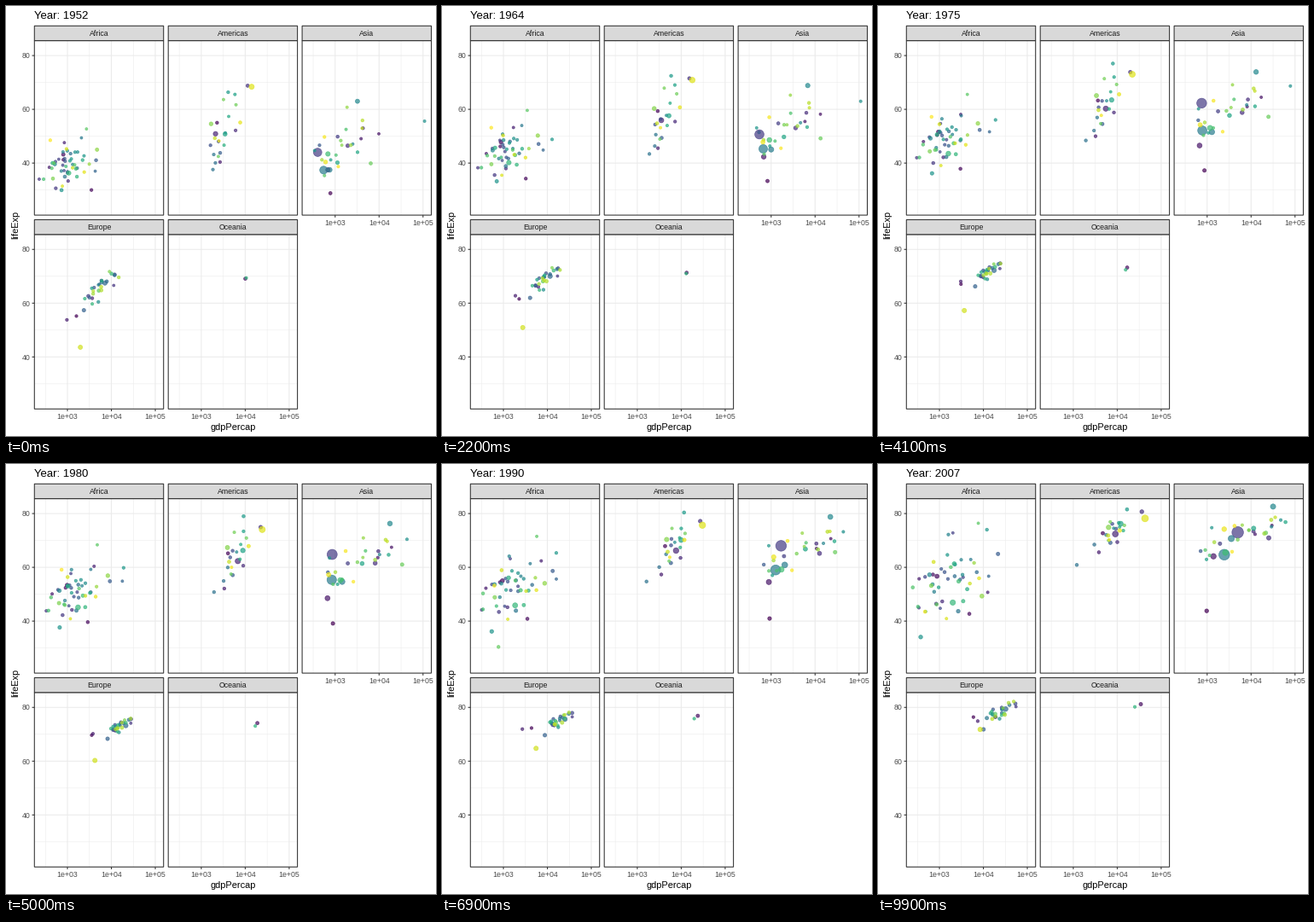
A matplotlib script that plays this animation: 504 px wide and 504 px high, repeating every 10000 ms.

```python
import numpy as np
import matplotlib.pyplot as plt
from matplotlib.animation import FuncAnimation
from matplotlib.patches import Rectangle

plt.rcParams.update({"font.family": "Liberation Sans", "path.snap": False})

SIDE, FRAMES, TOTAL = 504, 100, 142
LEFT, GAP, PW, PH, STRIP = 33.3, 5.5, 151.4, 204.5, 17.3
TOPS = (40.6, 267.8)
XLIM, YLIM = (2.2487, 5.1887), (20.65, 85.55)
STOPS = (52, 80, 107)            # years since 1900
YEARS = np.linspace(STOPS[0], STOPS[-1], FRAMES)
U = np.linspace(0, 1, FRAMES)

# Leading dots: colour rank, millions at the end, then income and life per stop
AFRICA = [
    (107, 9, 493, 40, 880, 46, 863, 46.2),
    (75, 6, 2388, 42.7, 19000, 60, 12057, 74),
    (45, 1, 4293, 37, 18000, 55, 13206, 56.7),
    (3, 12, 3521, 30, 2900, 39.7, 4797, 42.7),
    (105, 1, 2719, 52.7, 4800, 68.5, 7670, 76.4),
    (13, 2, 851, 47.6, 4100, 60.5, 12570, 50.7),
    (94, 135, 1077, 36.3, 1750, 45.2, 2014, 46.9),
    (117, 44, 4725, 45, 8350, 57, 9270, 49.3),
    (141, 12, 407, 48.5, 740, 59.2, 470, 43.5)]
AMERICAS = [
    (134, 301, 13990, 68.4, 24500, 74.1, 42952, 78.2),
    (20, 33, 11367, 68.8, 22600, 75, 36319, 80.7),
    (14, 190, 2109, 50.9, 6850, 62.4, 9066, 72.4),
    (82, 109, 3478, 50.8, 8900, 66.4, 11978, 76.2),
    (53, 9, 1840, 37.6, 1950, 50.9, 1202, 60.9),
    (11, 9, 2677, 40.4, 3350, 52.2, 3822, 65.6),
    (136, 26, 7690, 55.1, 12000, 68, 11416, 73.7)]
ASIA = [
    (24, 1319, 400, 44, 860, 64.9, 4959, 73),
    (58, 1110, 547, 37.4, 840, 55.5, 2452, 64.7),
    (59, 224, 750, 37.5, 1450, 54.8, 3541, 70.7),
    (66, 127, 3217, 63, 17900, 76.4, 31656, 82.6),
    (71, 3, 108382, 55.6, 42000, 70.5, 47307, 77.6),
    (0, 32, 779, 28.8, 890, 39.2, 975, 43.8),
    (8, 150, 684, 37.5, 670, 48.6, 1391, 64.1),
    (97, 169, 685, 43.4, 1320, 55.3, 2606, 65.5),
    (109, 28, 6460, 39.9, 33900, 61.2, 21655, 72.8),
    (7, 1, 9867, 50.9, 19300, 67.6, 29796, 75.6),
    (137, 85, 605, 40.4, 715, 57.4, 2442, 74.2)]
EUROPE = [
    (131, 71, 1969, 43.6, 4250, 60.4, 8458, 71.8),
    (12, 5, 974, 53.8, 3850, 70.3, 7446, 74.9),
    (1, 4, 1601, 55.2, 3600, 69.8, 5937, 76.4),
    (123, 8, 14734, 69.6, 27600, 75.9, 37506, 81.7),
    (47, 82, 7144, 67.5, 21500, 73.3, 32170, 79.4)]
OCEANIA = [
    (5, 20, 10040, 69.1, 19000, 74.2, 34435, 81.2),
    (91, 4, 10557, 69.4, 17000, 73.1, 25185, 80.2)]

# Extra stops for dots that turn sharply: year, income, life
TURNS = {24: [(62, 488, 44.5), (67, 613, 58.4)],
         71: [(72, 109348, 67.7)],
         75: [(67, 18773, 50.2)],
         13: [(92, 7954, 62.7), (102, 11004, 46.6)],
         107: [(87, 848, 44), (92, 737, 23.6), (97, 590, 36.1)],
         12: [(67, 2172, 64.8), (92, 2547, 72.2)]}

# name: leaders, column, row, crowd count, income-life correlation, growth
PANELS = {"Africa": (AFRICA, 0, 0, 43, 0.45, 0.4),
          "Americas": (AMERICAS, 1, 0, 18, 0.55, 0.4),
          "Asia": (ASIA, 2, 0, 22, 0.7, 0.42),
          "Europe": (EUROPE, 0, 1, 25, 0.85, 0.8),
          "Oceania": (OCEANIA, 1, 1, 0, 0, 0.5)}

# Crowd per stop: mean and spread of log income, mean and spread of life
CROWDS = {
    "Africa": [(2.98, .26, 39, 4.3), (3.13, .28, 50.3, 5), (3.18, .38, 55, 8)],
    "Americas": [(3.47, .18, 52, 7.5), (3.76, .17, 65, 5.5), (3.9, .22, 73.5, 2.8)],
    "Asia": [(3.15, .33, 47, 7.5), (3.56, .4, 62.5, 6), (3.78, .5, 71.8, 4.6)],
    "Europe": [(3.72, .2, 65.5, 3.8), (4.18, .15, 73, 1.9), (4.36, .23, 78, 2.6)]}

rng = np.random.default_rng(7)


def px(left, lg):
    return left + (lg - XLIM[0]) / (XLIM[1] - XLIM[0]) * PW


def py(top, life):
    return top + (YLIM[1] - life) / (YLIM[1] - YLIM[0]) * PH


def corner(col, row):
    return LEFT + col * (PW + GAP), TOPS[row]


def leader_track(rank, values):
    stops = list(zip(STOPS, values[::2], values[1::2])) + TURNS.get(rank, [])
    t, income, life = np.transpose(sorted(stops))
    return np.interp(YEARS, t, np.log10(income)), np.interp(YEARS, t, life)


def spread(n):
    """Normal scores with mean 0 and deviation 1, without far tails."""
    z = np.clip(rng.normal(size=n), -2, 2)
    return (z - z.mean()) / z.std()


def crowd_tracks(params, n, rho):
    """A cloud whose centre and width follow the stops while dots drift in it."""
    mg, sg, ml, sl = (np.interp(YEARS, STOPS, p)[:, None]
                      for p in np.transpose(params))
    turn = 0.7 * U[:, None]
    za, zb = (np.cos(turn) * spread(n) + np.sin(turn) * spread(n)
              for _ in range(2))
    life = ml + sl * (rho * za + np.sqrt(1 - rho ** 2) * zb)
    return mg + sg * za, life


def build():
    """Pixel positions and areas of every dot over the whole loop."""
    xy = np.zeros((FRAMES, TOTAL, 2))
    people = np.zeros((FRAMES, TOTAL))
    led = {row[0] for panel in PANELS.values() for row in panel[0]}
    free = list(rng.permutation([r for r in range(TOTAL) if r not in led]))
    for name, (leaders, col, row, n, rho, growth) in PANELS.items():
        left, top = corner(col, row)
        rise = growth + (1 - growth) * U
        for rank, pop, *values in leaders:
            lg, life = leader_track(rank, values)
            xy[:, rank] = np.column_stack([px(left, lg), py(top, life)])
            people[:, rank] = pop * rise
        if n:
            ranks, free = free[:n], free[n:]
            lg, life = crowd_tracks(CROWDS[name], n, rho)
            xy[:, ranks, 0], xy[:, ranks, 1] = px(left, lg), py(top, life)
            pops = np.clip(rng.lognormal(2.2, 1, n), 0.5, 80)
            people[:, ranks] = np.outer(rise, pops)
    size = 1 + 5 * np.sqrt(people / 1319)
    return xy, (0.75 * (size * 2.845 + 0.945)) ** 2


fig = plt.figure(figsize=(SIDE / 72, SIDE / 72), dpi=72, facecolor="white")
ax = fig.add_axes([0, 0, 1, 1])
ax.set(xlim=(0, SIDE), ylim=(SIDE, 0))
ax.axis("off")


def line(xs, ys, color, width, z):
    ax.plot(xs, ys, color=color, lw=width, zorder=z, solid_capstyle="butt")


def label(x, y, s, size, color, ha="center", va="baseline", **kw):
    return ax.text(x, y, s, size=size, color=color, ha=ha, va=va, **kw)


def draw_panel(name, col, row):
    left, top = corner(col, row)
    right, bottom = left + PW, top + PH
    for width, lgs, lives in ((0.53, (2.5, 3.5, 4.5), (30, 50, 70)),
                              (1.07, (3, 4, 5), (40, 60, 80))):
        for lg in lgs:
            line([px(left, lg)] * 2, [top, bottom], "#EBEBEB", width, 1)
        for life in lives:
            line([left, right], [py(top, life)] * 2, "#EBEBEB", width, 1)
    for y, h, fill in ((top, PH, "none"), (top - STRIP, STRIP, "#D9D9D9")):
        ax.add_patch(Rectangle((left, y), PW, h, fc=fill, ec="#333333",
                               lw=1.07, zorder=4))
    label(left + PW / 2, top - 5.5, name, 8.8, "#1A1A1A", zorder=5)
    if row == 1 or col == 2:
        for lg in (3, 4, 5):
            x = px(left, lg)
            line([x, x], [bottom, bottom + 2.75], "#333333", 1.07, 4)
            label(x, bottom + 11.6, f"1e+0{lg}", 8.8, "#4D4D4D")
    if col == 0:
        for life in (40, 60, 80):
            y = py(top, life)
            line([left - 2.75, left], [y, y], "#333333", 1.07, 4)
            label(left - 4.95, y + 3.2, str(life), 8.8, "#4D4D4D", "right")


for name, (_, col, row, *_) in PANELS.items():
    draw_panel(name, col, row)
label(265.9, 496.8, "gdpPercap", 11, "black")
label(15.9, 256.4, "lifeExp", 11, "black", "right", "center", rotation=90)
title = label(LEFT, 15, "", 13.2, "black", "left")

XY, AREAS = build()
dots = ax.scatter(XY[0, :, 0], XY[0, :, 1], s=AREAS[0], linewidths=0.71,
                  c=plt.cm.viridis(np.linspace(0, 1, TOTAL)), alpha=0.7,
                  zorder=3)


def update(i):
    dots.set_offsets(XY[i])
    dots.set_sizes(AREAS[i])
    title.set_text(f"Year: {1900 + round(YEARS[i])}")
    return dots, title


anim = FuncAnimation(fig, update, frames=FRAMES, interval=100, repeat=True)
plt.show()
```
